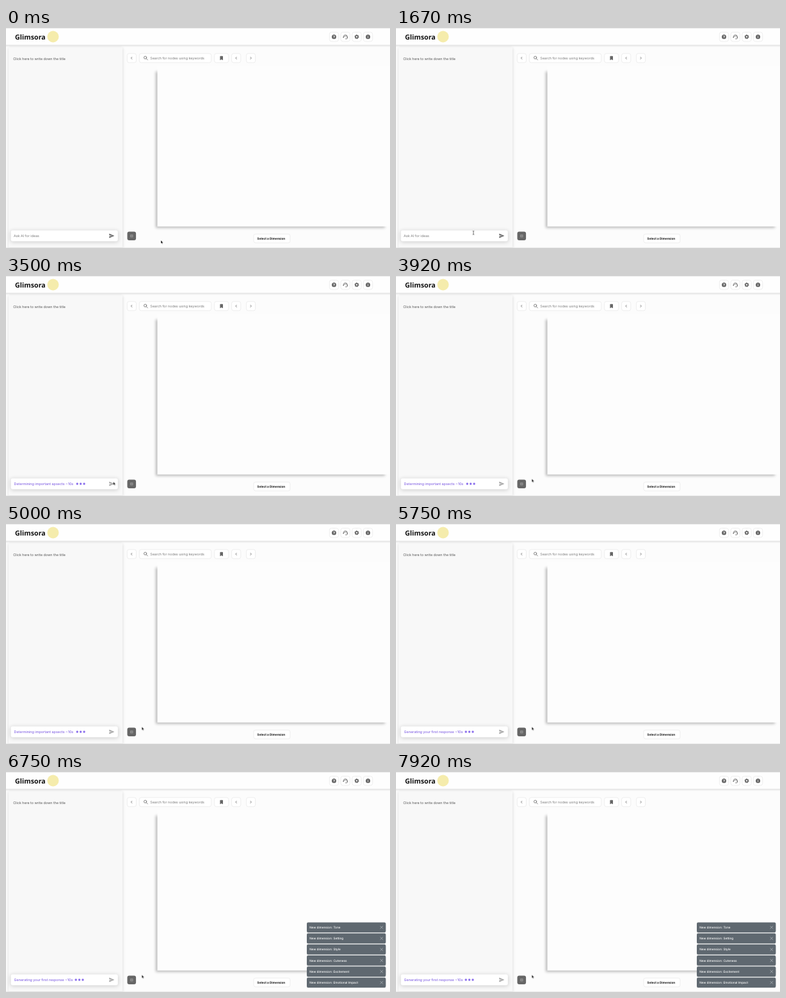
An HTML page that plays this animation: 600x343 px, repeating every 8000 ms.

```html
<!DOCTYPE html>
<html lang="en">
<head>
<meta charset="utf-8">
<title>Idea explorer</title>
<style>
  html, body { margin: 0; width: 100%; height: 100%; overflow: hidden; background: #fcfcfc; }
  svg { display: block; width: 100%; height: 100%; }
  text { font: 400 5.36px Inter, "Open Sans", sans-serif; fill: #555; text-rendering: geometricPrecision; }
  .brand { font: 600 10.7px "Noto Sans", "Open Sans", sans-serif; fill: #111; }
  .hint { fill: #7b7b7b; }
  .typed { fill: #222; }
  .busy { font-weight: 500; fill: #8768e4; }
  .label { font-size: 4.69px; font-weight: 700; fill: #111; }
  .glyph { font-size: 5.6px; font-weight: 700; fill: #fff; text-anchor: middle; }
  .box { fill: #fff; stroke: #e3e3e3; stroke-width: .6; }
  .line { fill: none; stroke: #666; stroke-width: .8; stroke-linecap: round; stroke-linejoin: round; }
  .icon { fill: #666; }
  .toast rect { fill: #5f6870; }
  .toast text { font-size: 4.69px; font-weight: 500; fill: #fff; }
  .toast path { fill: none; stroke: #c9cdd1; stroke-width: .55; }

  /* Everything shares one 8 s cycle. */
  .t { animation: 8s step-end infinite; }
  #cursor { animation: travel 8s ease-in-out infinite; }
  #arrow { animation-name: arrow; }
  #beam { animation-name: beam; }
  #hand, #hover { animation-name: hand; }
  #ask { animation-name: ask; }
  #prompt { animation-name: prompt; }
  #step1 { animation-name: step1; }
  #step2 { animation-name: step2; }
  #caret1 { animation-name: caret1; }
  #caret2 { animation-name: caret2; }
  #send { animation-name: send; }
  #toasts { animation: toasts 8s linear infinite; }
  .dot { fill: #8c70ec; animation: flash 8s linear infinite; }
  .dot:nth-of-type(2) { animation-delay: .5s; }
  .dot:nth-of-type(3) { animation-delay: 1s; }

  @keyframes travel {
    0%, 2.125% { transform: translate(242px, 331px); }
    12.5%, 28.125% { transform: translate(121px, 319.3px); }
    34.375%, 42.5% { transform: translate(163.2px, 321.2px); }
    48.5%, 100% { transform: translate(212.2px, 316.3px); }
  }
  @keyframes arrow { 0% { opacity: 1; } 7.8% { opacity: 0; } 36.5%, 100% { opacity: 1; } }
  @keyframes beam { 0% { opacity: 0; } 8.6% { opacity: 1; } 32.5%, 100% { opacity: 0; } }
  @keyframes hand {
    0% { opacity: 0; } 7.8% { opacity: 1; } 8.6% { opacity: 0; }
    32.5% { opacity: 1; } 36.5%, 100% { opacity: 0; }
  }
  @keyframes ask { 0% { opacity: 1; } 21.875%, 100% { opacity: 0; } }
  @keyframes prompt { 0% { opacity: 0; } 21.875% { opacity: 1; } 36.5%, 100% { opacity: 0; } }
  @keyframes step1 { 0% { opacity: 0; } 36.5% { opacity: 1; } 67.75%, 100% { opacity: 0; } }
  @keyframes step2 { 0% { opacity: 0; } 67.75%, 100% { opacity: 1; } }
  @keyframes caret1 { 0% { opacity: 0; } 14.625% { opacity: 1; } 20.875%, 100% { opacity: 0; } }
  @keyframes caret2 { 0% { opacity: 0; } 21.875% { opacity: 1; } 28.125%, 100% { opacity: 0; } }
  @keyframes send { 0% { fill: #6a6a6a; } 36.5%, 100% { fill: #a6a6a6; } }
  @keyframes toasts { 0%, 74% { opacity: 0; } 76%, 100% { opacity: 1; } }
  @keyframes flash {
    0%, 36.5%, 61.5%, 86.5% { fill: #8c70ec; }
    42.75%, 55.25%, 67.75%, 80.25%, 92.75%, 100% { fill: #d5cfe8; }
  }
</style>
</head>
<body>
<svg viewBox="0 0 600 343">
  <defs>
    <filter id="soft" x="-10%" y="-10%" width="120%" height="120%"><feGaussianBlur stdDeviation="2"/></filter>
    <filter id="wide" x="-10%" y="-60%" width="120%" height="220%"><feGaussianBlur stdDeviation="3"/></filter>
    <g id="dots">
      <circle class="dot" r="1.7"/>
      <circle class="dot" cx="5.4" r="1.7"/>
      <circle class="dot" cx="10.8" r="1.7"/>
    </g>
  </defs>

  <rect width="600" height="343" fill="#fcfcfc"/>

  <!-- canvas panel -->
  <rect x="234" y="68" width="358" height="243.5" fill="#000" opacity=".27" filter="url(#soft)"/>
  <rect x="236.5" y="60" width="363.5" height="249.5" fill="#fdfdfd"/>

  <!-- writing panel -->
  <rect x="4" y="31" width="178.5" height="312" fill="#000" opacity=".13" filter="url(#soft)"/>
  <rect x="4" y="30" width="178" height="312" rx="1" fill="#f8f8f8"/>
  <text x="11.2" y="50.3">Click here to write down the title</text>

  <!-- header -->
  <rect x="-5" y="0" width="610" height="26.5" fill="#000" opacity=".22" filter="url(#soft)"/>
  <rect width="600" height="26.3" fill="#fefefe"/>
  <path d="M0 .3H600M0 342.7H600" stroke="#d6d6d6" stroke-width=".6"/>
  <text class="brand" x="14" y="17.8">Glimsora</text>
  <circle cx="73.5" cy="13.5" r="9" fill="#f5ecac"/>

  <g transform="translate(512.5 13.7)">
    <rect class="box" x="-7.2" y="-7.2" width="14.4" height="14.4" rx="3.5"/>
    <circle class="icon" r="3.5"/><text class="glyph" y="2">?</text>
  </g>
  <g transform="translate(530.3 13.7)">
    <rect class="box" x="-7.2" y="-7.2" width="14.4" height="14.4" rx="3.5"/>
    <path class="line" d="M-3 .8V0A3 3 0 0 1 3 0V2.4Q3 3.2 2 3.2H.2M-1.8-.4Q.4-.6.8-2Q1.4-.7 2.4-.6"/>
    <path d="M-3 .1V1.5M3 .1V1.5" stroke="#666" stroke-width="1.4"/>
  </g>
  <g transform="translate(548 13.7)">
    <rect class="box" x="-7.2" y="-7.2" width="14.4" height="14.4" rx="3.5"/>
    <circle r="2" fill="none" stroke="#666" stroke-width="1.7"/>
    <circle r="3.1" fill="none" stroke="#666" stroke-width=".9" stroke-dasharray="1.62"/>
  </g>
  <g transform="translate(565.6 13.7)">
    <rect class="box" x="-7.2" y="-7.2" width="14.4" height="14.4" rx="3.5"/>
    <circle class="icon" r="3.5"/><path d="M0-1.9V-1.1M0-.4V1.9" stroke="#fff" stroke-width=".8"/>
  </g>

  <!-- toolbar -->
  <rect class="box" x="189.3" y="39.8" width="14.2" height="14.2" rx="3"/>
  <path class="line" d="M196.9 45.3L195.4 46.9L196.9 48.5"/>
  <rect class="box" x="208.3" y="39.8" width="112.5" height="14.2" rx="3"/>
  <circle class="line" cx="217.6" cy="46.1" r="2.1"/><path class="line" d="M219.2 47.7L221.4 49.9"/>
  <text class="hint" x="225.2" y="48.8">Search for nodes using keywords</text>
  <rect class="box" x="325.6" y="39.8" width="22.2" height="14.2" rx="3"/>
  <path class="icon" d="M334.4 44.4Q334.4 43.8 335 43.8H338.4Q339 43.8 339 44.4V50.2L336.7 49.1L334.4 50.2Z"/>
  <rect class="box" x="352.6" y="39.8" width="14.2" height="14.2" rx="3"/>
  <path class="line" d="M360.3 45.3L358.8 46.9L360.3 48.5"/>
  <rect class="box" x="375.5" y="39.8" width="14.2" height="14.2" rx="3"/>
  <path class="line" d="M381.9 45.3L383.4 46.9L381.9 48.5"/>

  <rect x="189.5" y="317.5" width="13.6" height="13.6" rx="3" fill="#666"/>
  <rect x="194" y="322" width="4.6" height="4.6" rx=".8" fill="#8f8f8f"/>
  <path d="M195 323.6H197.6M195 325H197.6" stroke="#666" stroke-width=".5"/>
  <rect class="box" x="387" y="321.2" width="57" height="13.8" rx="3"/>
  <text class="label" x="392.6" y="329.8">Select a Dimension</text>

  <!-- prompt field -->
  <rect x="7" y="316" width="168.5" height="18" rx="3" fill="#000" opacity=".16" filter="url(#wide)"/>
  <rect x="7.6" y="315.6" width="167.2" height="17" rx="3" fill="#fff"/>
  <text id="ask" class="hint t" x="12" y="325.8">Ask AI for ideas</text>
  <text id="prompt" class="typed t" x="12" y="325.8">write a story about a rabbit</text>
  <path id="caret1" class="t" d="M12 320.6V327.2" stroke="#222" stroke-width=".5"/>
  <path id="caret2" class="t" d="M81.3 320.6V327.2" stroke="#222" stroke-width=".5"/>
  <g id="step1" class="t">
    <text class="busy" x="12.6" y="325.8">Determining important apsects ~10s</text>
    <use href="#dots" x="111.3" y="324"/>
  </g>
  <g id="step2" class="t">
    <text class="busy" x="12.6" y="325.8">Generating your first response ~10s</text>
    <use href="#dots" x="109.2" y="324"/>
  </g>
  <circle id="hover" class="t" cx="165" cy="324" r="7.4" fill="#e9e9e9"/>
  <path id="send" class="t" d="M161.3 320.6L169.4 324L161.3 327.4V324.8L166.5 324L161.3 323.2Z"/>

  <g id="toasts"></g>

  <g id="cursor">
    <path id="arrow" class="t" d="M0 0V5L1.2 4L2 5.8L2.9 5.4L2.1 3.7H3.7Z" fill="#111" stroke="#fff" stroke-width=".35"/>
    <path id="beam" class="t" d="M-1.3-2.8Q0-2.8 0-2Q0-2.8 1.3-2.8M0-2V2M-1.3 2.8Q0 2.8 0 2Q0 2.8 1.3 2.8" fill="none" stroke="#222" stroke-width=".65"/>
    <path id="hand" class="t" d="M-.6.2Q0-.4.6.2V2.2L3 2.7Q3.7 2.9 3.6 3.7L3 6.4H.1L-1.9 3.8Q-1.8 3-.6 3.8Z" fill="#fff" stroke="#222" stroke-width=".6"/>
  </g>
</svg>
<script>
  const names = ["Tone", "Setting", "Style", "Cuteness", "Excitement", "Emotional Impact"];
  document.getElementById("toasts").innerHTML = names.map((name, i) => `
    <g class="toast" transform="translate(470 ${234.4 + i * 17.22})">
      <rect y="1" width="123.4" height="15.6" rx="2" opacity=".25"/>
      <rect width="123.4" height="15.6" rx="2"/>
      <text x="4.2" y="9.5">New dimension: ${name}</text>
      <path d="M114.6 5.6l4.4 4.4m0-4.4l-4.4 4.4"/>
    </g>`).join("");
</script>
</body>
</html>
```
